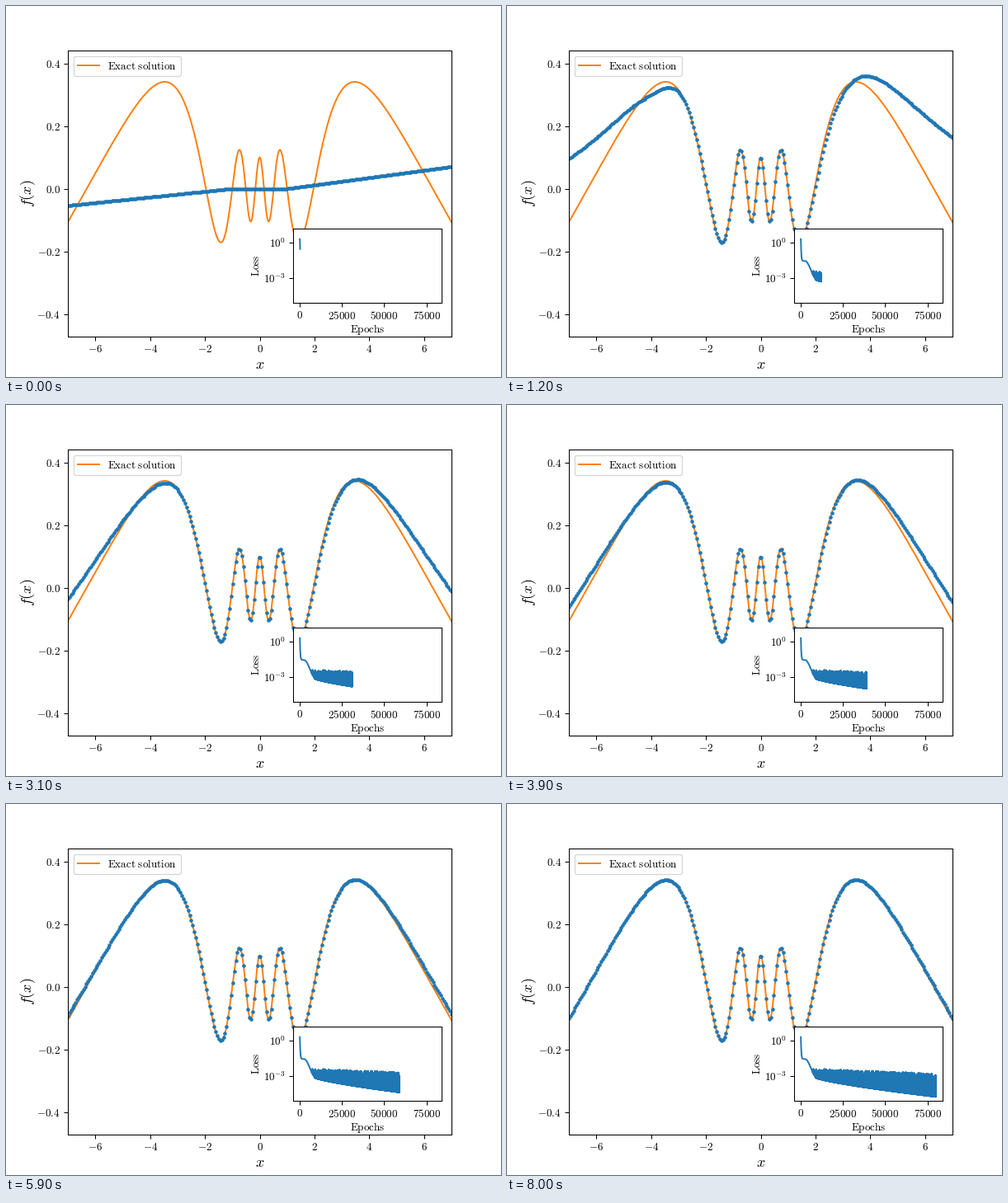
Recreate the animation shown at these times as a matplotlib script. Size 600 px wide and 450 px high, loop 8.1 s.

```python
import numpy as np
import matplotlib.pyplot as plt
from matplotlib.animation import FuncAnimation
from matplotlib.ticker import FuncFormatter, NullLocator

plt.rcParams.update({
    "font.family": "Liberation Serif",
    "mathtext.fontset": "cm",
    "figure.dpi": 93.75,
})
BLUE, ORANGE = "C0", "C1"
FRAMES, INTERVAL = 81, 100
EPOCHS_PER_FRAME, EPOCH_STEP = 1000, 50
LAST_EPOCH = (FRAMES - 1) * EPOCHS_PER_FRAME


def roman(text):
    return r"$\mathrm{%s}$" % text.replace(" ", r"\ ")


def number_format(spec):
    return FuncFormatter(lambda v, _: f"${v:{spec}}$")


def smoothstep(a, b, x):
    u = np.clip((x - a) / (b - a), 0, 1)
    return u * u * (3 - 2 * u)


def exact(x, n=10):
    """Solution of f'' + (n^2 - 1) / (1 + x^2)^2 f = 0."""
    return np.sqrt(1 + x**2) / n * np.cos(n * np.arctan(x))


def untrained(x):
    return .009 * np.minimum(x + 1, 0) + .0117 * np.maximum(x - 1, 0)


def tail_error(r, zero):
    """Error over r = |x|: fades out inside, crosses at zero, one at r = 7."""
    u = (r - zero) / (7 - zero)
    return u * (.75 + .25 * u) * smoothstep(zero - 1.8, zero + .2, r)


def prediction(x, k):
    r = np.abs(x)
    error = np.where(x < 0, .203 * tail_error(r, 4.4),
                     .27 * tail_error(r, 3.3))
    trained = exact(x) + error * np.exp((12 - k) / 18)
    # The fit spreads outward from the centre.
    reach = k**2 / 6
    weight = 1 - smoothstep(reach - 1.5, reach, r)
    return untrained(x) + weight * (trained - untrained(x))


def make_loss(epochs):
    """Falling floor with random spikes that reach up to a slow ceiling."""
    rng = np.random.default_rng(4)
    late = np.clip((epochs - 8000) / (LAST_EPOCH - 8000), 0, 1)
    floor = (-1.55 + 1.85 * np.exp(-epochs / 250)
             - 1.55 * smoothstep(2500, 9500, epochs) - 1.65 * late**.75)
    level = np.repeat(rng.random(len(epochs) // 12 + 1), 12)[:len(epochs)]
    top = (-2.3 - .45 * epochs / LAST_EPOCH
           - .35 * level**3 - .25 * rng.random(len(epochs)))
    spikes = (np.arange(len(epochs)) % 2) * smoothstep(4800, 7500, epochs)
    return 10 ** (floor + spikes * np.maximum(top - floor, 0))


fig, ax = plt.subplots(figsize=(6.4, 4.8))
x_line = np.linspace(-7, 7, 1000)
x_dots = np.linspace(-7, 7, 250)
ax.plot(x_line, exact(x_line), color=ORANGE, label=roman("Exact solution"))
dots, = ax.plot([], [], ".", color=BLUE, markersize=5)
ax.set(xlim=(-7, 7), ylim=(-.471, .441),
       xticks=range(-6, 7, 2), yticks=np.arange(-2, 3) / 5)
ax.xaxis.set_major_formatter(number_format(".0f"))
ax.yaxis.set_major_formatter(number_format(".1f"))
ax.set_xlabel("$x$", fontsize=14, labelpad=3.3)
ax.set_ylabel("$f(x)$", fontsize=14, labelpad=-.6)
ax.legend(loc="upper left")

inset = fig.add_axes([.58, .2, .3, .2])
loss_line, = inset.plot([], [], color=BLUE)
inset.set_yscale("log")
inset.set(xlim=(-4000, 84000), ylim=(10**-5.09, 10**1.19),
          xticks=range(0, 75001, 25000), yticks=[1e-3, 1])
inset.yaxis.set_minor_locator(NullLocator())
inset.xaxis.set_major_formatter(number_format(".0f"))
inset.yaxis.set_major_formatter(
    FuncFormatter(lambda v, _: "$10^{%d}$" % round(np.log10(v))))
inset.set_xlabel(roman("Epochs"), labelpad=.9)
inset.set_ylabel(roman("Loss"), labelpad=1.2)

epochs = np.arange(0, LAST_EPOCH + 1, EPOCH_STEP)
loss = make_loss(epochs)


def update(k):
    dots.set_data(x_dots, prediction(x_dots, k))
    count = max(4, k * EPOCHS_PER_FRAME // EPOCH_STEP + 1)
    loss_line.set_data(epochs[:count], loss[:count])
    return dots, loss_line


anim = FuncAnimation(fig, update, frames=FRAMES, interval=INTERVAL,
                     repeat=True, repeat_delay=0)
plt.show()
```
